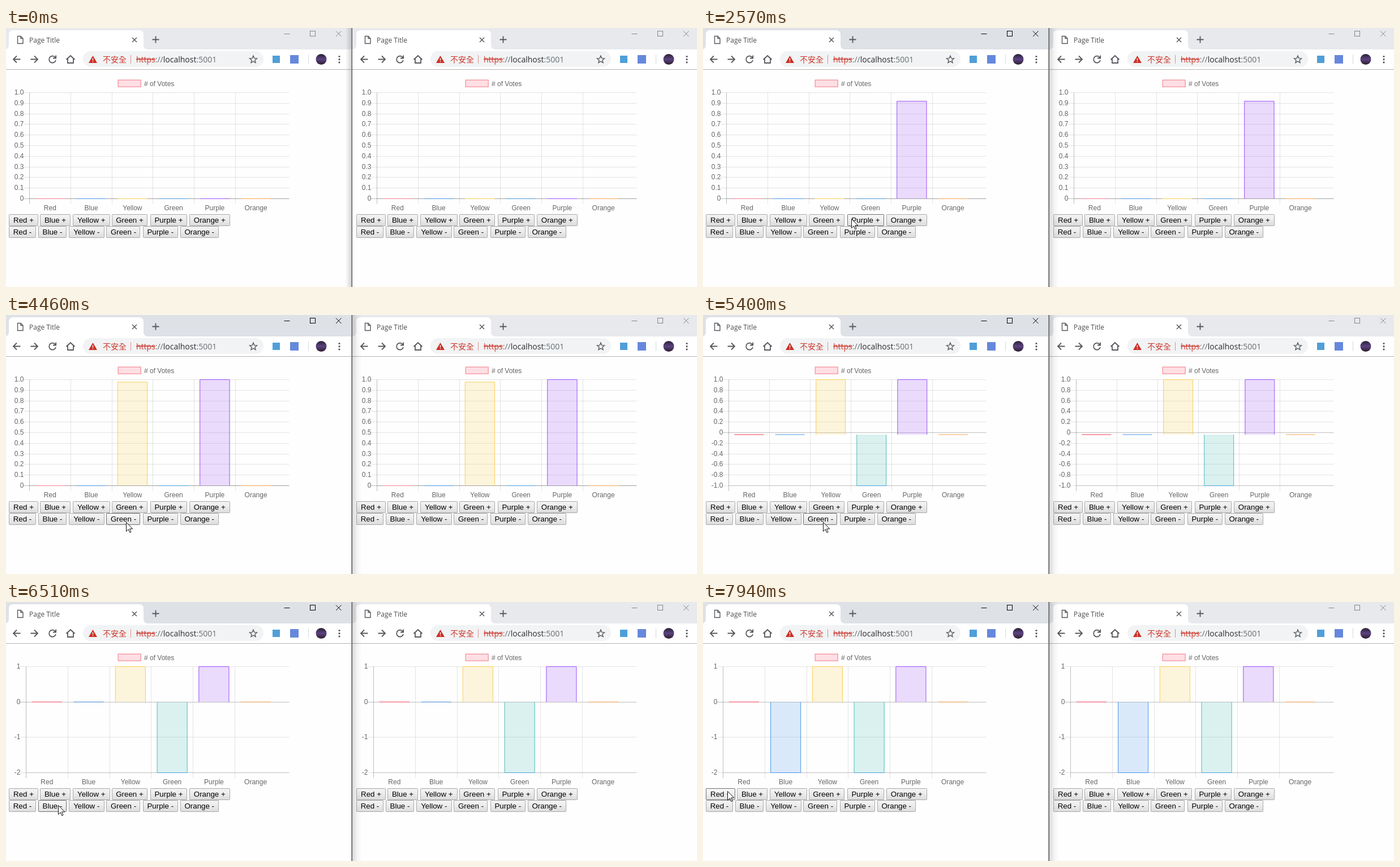
Animation of 1221x459 px, one loop 7.99 s. Source, as an HTML page:

```html
<!DOCTYPE html>
<html lang="en">
<head>
<meta charset="utf-8">
<title>Live votes</title>
<style>
  html, body { margin: 0; width: 100%; height: 100%; overflow: hidden; background: #fff; }
  svg { display: block; }
  .ui { font-family: "Open Sans", sans-serif; }
  .cjk { font: 14px "Noto Sans CJK TC", "Noto Sans CJK SC", "Noto Sans CJK JP", "Noto Sans CJK", sans-serif; }
  .chart text { font: 12px "Liberation Sans", Arial, sans-serif; fill: #666; }
  .btn text { font: 13.333px "Liberation Sans", Arial, sans-serif; fill: #000; text-anchor: middle; }
  .btn rect { fill: url(#face); stroke: #a9a9a9; }
  .btn.hover rect { fill: url(#lit); stroke: #6e6e6e; }
  .icon { fill: none; stroke: #55585c; stroke-width: 1.8; }
  .controls { fill: none; stroke: #858585; }
  .strip { fill: #e7e9ed; }
  .active .controls { stroke: #000; }
  .active .strip { fill: #dee1e6; }
</style>
</head>
<body>
<svg id="stage" width="1221" height="459" viewBox="0 0 1221 459"></svg>
<script>
const LOOP = 7990, ACTIVATE = 2010, SHOW = 800, DURATION = 1000;
const TOP = 114.5, BOTTOM = 302.5, RIGHT = 478, LINE_END = 500.5, SHIFT = 614;

// name, colour, optional colour of the value edge
const BARS = [
  ["Red", "255,99,132", "244,130,145"],
  ["Blue", "74,150,232"],
  ["Yellow", "250,206,86"],
  ["Green", "75,190,185", "74,158,220"],
  ["Purple", "155,80,248"],
  ["Orange", "250,165,80"]
];

const AXES = {
  unit: { left: 41.5, min: 0, max: 1, step: 0.1, digits: 1 },
  mirror: { left: 45.5, min: -1, max: 1, step: 0.2, digits: 1 },
  whole: { left: 35.5, min: -2, max: 1, step: 1, digits: 0 }
};

// start time, axis, votes per bar
const UPDATES = [
  [-DURATION, AXES.unit, [0, 0, 0, 0, 0, 0]],
  [2105, AXES.unit, [0, 0, 0, 0, 1, 0]],
  [3853, AXES.unit, [0, 0, 1, 0, 1, 0]],
  [4840, AXES.mirror, [0, 0, 1, -1, 1, 0]],
  [5626, AXES.whole, [0, 0, 1, -2, 1, 0]],
  [6550, AXES.whole, [0, -1, 1, -2, 1, 0]],
  [7031, AXES.whole, [0, -2, 1, -2, 1, 0]]
];

// pointer stops: time, x, y
const STOPS = [
  [800, 951, 446], [1250, 262, 338], [2850, 262, 338], [3180, 212, 367],
  [3540, 150, 340], [3900, 150, 340], [4330, 212, 367], [5560, 212, 367],
  [5800, 202, 367], [5960, 202, 367], [6220, 112, 360], [6400, 92, 360],
  [7620, 92, 360], [7850, 85, 339], [7940, 43, 335]
];

// left edge and width of each button, per row
const ROWS = [
  ["+", 330, [[5, 52], [60, 54], [118, 65.5], [187, 63], [255, 65], [324, 71.5]]],
  ["-", 351, [[5, 48], [57, 50], [111, 62.5], [177.5, 60], [242, 61.5], [308, 67.5]]]
];

const stage = document.getElementById("stage");
const mix = (a, b, k) => a + (b - a) * k;
const clamp = v => Math.min(1, Math.max(0, v));
const snap = v => Math.floor(v) + 0.5;
const easeOutQuart = p => 1 - Math.pow(1 - clamp(p), 4);
const easeInOut = p => p * p * (3 - 2 * p);
const yOf = (axis, v) => BOTTOM - (v - axis.min) / (axis.max - axis.min) * (BOTTOM - TOP);
const line = (x1, y1, x2, y2, alpha) =>
  `<path d="M${x1} ${y1}L${x2} ${y2}" stroke="rgba(0,0,0,${alpha})"/>`;

const buttons = ROWS.flatMap(([sign, y, spans]) =>
  spans.map(([x, w], i) => ({ x, y, w, h: 21, label: `${BARS[i][0]} ${sign}` })));

const buttonSvg = b => `<g class="btn">
  <rect x="${snap(b.x)}" y="${b.y + 0.5}" width="${Math.round(b.w - 1)}" height="20" rx="0.8"/>
  <text x="${b.x + b.w / 2}" y="${b.y + 15}">${b.label}</text></g>`;

function windowSvg(id, shift) {
  return `<g id="${id}" transform="translate(${shift} 0)">
    <rect x="-3" width="614" height="459" fill="#fefefe"/>
    <rect class="strip" x="-3" width="614" height="38"/>
    <path d="M-3 38Q5 38 5 30V12Q5 4 13 4H235Q243 4 243 12V30Q243 38 251 38Z" fill="#fff"/>
    <rect x="-3" y="38" width="614" height="35" fill="#fff"/>
    <path d="M-3 73.5H611" stroke="#b3b3b3"/>
    <g class="icon" stroke-width="1.5">
      <path d="M20.5 14.5H26L30 18.5V27.5H20.5ZM26 14.5V18.5H30" stroke-width="1.4"/>
      <path d="M223 17L231 25M231 17L223 25" style="stroke-width:1.5"/>
      <path d="M258.5 20.5H270.5M264.5 14.5V26.5"/>
      <path d="M25.5 55.5H13M19 49.5L13 55.5L19 61.5"/>
      <path d="M43.5 55.5H56M50 49.5L56 55.5L50 61.5"/>
      <path d="M87.3 52.5A6 6 0 1 0 88 57M88.2 48.5V53.5H83"/>
      <path d="M106.5 56L114 49L121.5 56M109 54.5V62H119V54.5"/>
    </g>
    <g class="controls">
      <path d="M491.5 10.5H501.5"/>
      <rect x="537.5" y="5.5" width="9" height="9"/>
      <path d="M583 5.5L592.5 15M592.5 5.5L583 15"/>
    </g>
    <text class="ui" x="41" y="26" font-size="12" fill="#4a4d51">Page Title</text>
    <rect x="136" y="41" width="319" height="28" rx="14" fill="#f1f3f4"/>
    <path d="M153.5 49L161 62H146Z" fill="#cc2f25"/>
    <path d="M153.5 53.5V57.5M153.5 58.8V60.3" stroke="#fff" stroke-width="1.4"/>
    <text class="cjk" x="171" y="60.5" fill="#cf3a30">不安全</text>
    <path d="M220.5 48V63" stroke="#d98f8a"/>
    <text class="ui" x="230" y="60.5" font-size="14" fill="#6a6e73"><tspan fill="#cc3a30" text-decoration="line-through">https</tspan>://<tspan fill="#2b2d30">localhost</tspan>:5001</text>
    <path d="M437 49.2L438.8 53.6L443.5 54L439.9 57L441 61.6L437 59.1L433 61.6L434.1 57L430.5 54L435.2 53.6Z"
      fill="none" stroke="#5a5d61" stroke-width="1.4"/>
    <rect x="471" y="49" width="13" height="13" fill="#4f9fd8"/>
    <rect x="502" y="48" width="15" height="15" fill="#6688dc"/>
    <path d="M534.5 47V64" stroke="#d5d8dc"/>
    <circle cx="557" cy="55.5" r="9.5" fill="url(#photo)"/>
    <g fill="#55585c"><circle cx="589" cy="50.5" r="1.6"/><circle cx="589" cy="55.7" r="1.6"/><circle cx="589" cy="60.9" r="1.6"/></g>
    <g class="chart"></g>
    ${buttons.map(buttonSvg).join("")}
  </g>`;
}

function gradient(id, stops, attrs) {
  return `<linearGradient id="${id}" ${attrs}>` +
    stops.map(([at, color, alpha]) => `<stop offset="${at}" stop-color="${color}" stop-opacity="${alpha ?? 1}"/>`).join("") +
    `</linearGradient>`;
}

const down = 'x1="0" y1="0" x2="0" y2="1"';
stage.innerHTML = `<defs>
  ${gradient("face", [[0, "#f4f4f4"], [0.4, "#ededed"], [1, "#dcdcdc"]], down)}
  ${gradient("lit", [[0, "#f8f8f8"], [0.4, "#f0f0f0"], [1, "#e0e0e0"]], down)}
  ${gradient("photo", [[0, "#2a2034"], [0.5, "#5b4380"], [1, "#2c1c2c"]], down)}
  ${gradient("shadeL", [[0, "#000", 0], [1, "#000", 0.16]], "")}
  ${gradient("shadeR", [[0, "#000", 0.15], [0.5, "#000", 0.04], [1, "#000", 0]], "")}
  </defs>
  ${windowSvg("left", 0)}${windowSvg("right", SHIFT)}
  <rect id="shadowL" x="600" width="10" height="459" fill="url(#shadeL)"/>
  <rect id="shadowR" x="612" width="17" height="459" fill="url(#shadeR)"/>
  <rect x="610" width="1" height="459" fill="#a0a0a0"/>
  <rect x="611" width="1" height="459" fill="#555"/>
  <path id="pointer" d="M0.5 0.5V16.5L4.3 12.9L6.8 18.6L9 17.6L6.6 12H11.8Z" fill="#fff" stroke="#111"/>`;

const find = sel => stage.querySelector(sel);
const charts = stage.querySelectorAll(".chart");
const left = find("#left"), pointer = find("#pointer");
const leftButtons = [...left.querySelectorAll(".btn")];

// Each update starts from wherever the bar is at that moment.
function barAt(t, i, n) {
  const [start, axis, votes] = UPDATES[n];
  const step = (RIGHT - axis.left) / 6;
  const goal = [axis.left + step * (i + 0.5), step * 0.72, yOf(axis, votes[i]), yOf(axis, 0)];
  if (n === 0) return goal;
  const from = barAt(start, i, n - 1), k = easeOutQuart((t - start) / DURATION);
  return goal.map((g, j) => mix(from[j], g, k));
}

function gridSvg(axis) {
  const step = (RIGHT - axis.left) / 6;
  const count = Math.round((axis.max - axis.min) / axis.step);
  let out = "";
  for (let i = 0; i <= count; i++) {
    const v = axis.max - i * axis.step, y = snap(yOf(axis, v));
    const zero = Math.abs(v) < 1e-6;
    out += line(axis.left - 10, y, LINE_END, y, zero ? 0.25 : 0.1);
    out += `<text x="${axis.left - 10}" y="${y + 3.7}" text-anchor="end">${zero ? 0 : v.toFixed(axis.digits)}</text>`;
  }
  BARS.forEach(([name], i) => {
    const x = snap(axis.left + step * i);
    out += line(x, TOP, x, 312, i ? 0.1 : 0.25);
    out += `<text x="${axis.left + step * (i + 0.5)}" y="323" text-anchor="middle">${name}</text>`;
  });
  return out + line(axis.left, BOTTOM, LINE_END, BOTTOM, 0.16);
}

function barSvg([, color, edge], [x, w, y, base]) {
  const a = x - w / 2, b = x + w / 2;
  return `<rect x="${a}" y="${Math.min(y, base)}" width="${w}" height="${Math.abs(base - y)}" fill="rgba(${color},.2)"/>
    <path d="M${a} ${base}V${y}H${b}V${base}" fill="none" stroke="rgb(${color})"/>` +
    (edge ? `<path d="M${a} ${y}H${b}" stroke="rgb(${edge})"/>` : "");
}

function chartSvg(t) {
  const n = UPDATES.findLastIndex(u => u[0] <= t);
  return `<rect x="198.2" y="92.2" width="40" height="12" fill="#ffdfe4" stroke="#f5919c" stroke-width="1.3"/>
    <text x="244" y="103">#&#160;of Votes</text>` +
    gridSvg(UPDATES[n][1]) +
    BARS.map((bar, i) => barSvg(bar, barAt(t, i, n))).join("");
}

function pointerAt(t) {
  const n = STOPS.findIndex(s => s[0] > t);
  if (n < 0) return STOPS[STOPS.length - 1].slice(1);
  if (n === 0) return [-50, -50];
  const [t0, x0, y0] = STOPS[n - 1], [t1, x1, y1] = STOPS[n];
  const k = easeInOut((t - t0) / (t1 - t0));
  return [mix(x0, x1, k), mix(y0, y1, k)];
}

function render(t) {
  const active = t >= ACTIVATE;
  left.classList.toggle("active", active);
  find("#shadowL").style.display = active ? "none" : "";
  find("#shadowR").style.display = active ? "" : "none";

  const svg = chartSvg(t);
  charts.forEach(c => { c.innerHTML = svg; });

  const [x, y] = pointerAt(t).map(Math.round);
  pointer.style.display = t >= SHOW ? "" : "none";
  pointer.setAttribute("transform", `translate(${x} ${y})`);
  buttons.forEach((b, i) => leftButtons[i].classList.toggle("hover",
    x >= b.x && x < b.x + b.w && y >= b.y && y < b.y + b.h));
}

function tick() {
  render(performance.now() % LOOP);
  requestAnimationFrame(tick);
}
tick();
</script>
</body>
</html>
```
